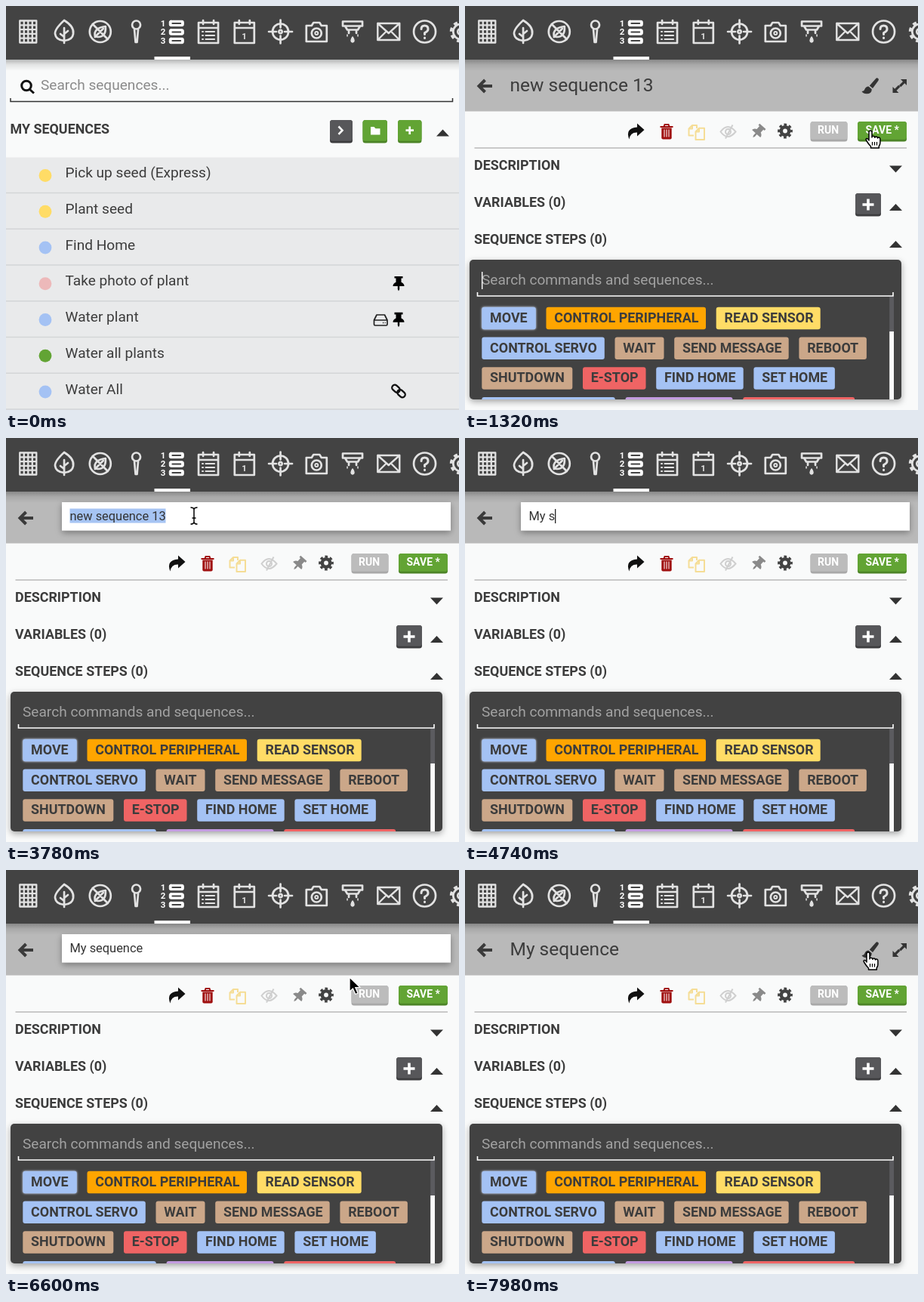
Write an HTML page that moves like this. It is 600 px wide and 535 px high and loops after 8000 ms.

```html
<!DOCTYPE html>
<html lang="en">
<head>
<meta charset="utf-8">
<title>Sequence editor</title>
<style>
  html, body { margin: 0; width: 100%; height: 100%; overflow: hidden; background: #f9fafa; }
  svg { display: block; width: 600px; height: 535px; }
  text { font-family: Roboto, sans-serif; font-size: 19.1px; fill: #3c3c3c; white-space: pre; }
  .head { font-size: 17.9px; font-weight: 700; }
  .small { font-size: 14px; font-weight: 700; fill: #fff; }
  .title { font-size: 24.5px; }
  .field { font-size: 16.4px; fill: #333; }
  .line { fill: none; stroke: #e2e2e2; stroke-width: 2.7; stroke-linecap: round; stroke-linejoin: round; }
  .mini { font-size: 11.5px; font-weight: 700; fill: #e2e2e2; stroke: none; }
</style>
</head>
<body>
<svg viewBox="0 0 600 535">
  <defs>
    <linearGradient id="fade" x2="0" y2="1">
      <stop stop-color="#000" stop-opacity=".27"/>
      <stop offset=".45" stop-color="#000" stop-opacity=".09"/>
      <stop offset="1" stop-color="#000" stop-opacity="0"/>
    </linearGradient>
    <filter id="shadow" x="-10%" y="-40%" width="120%" height="190%">
      <feDropShadow dx="0" dy="3" stdDeviation="4" flood-opacity=".35"/>
    </filter>
    <filter id="glow" x="-20%" y="-30%" width="140%" height="160%">
      <feDropShadow dx="0" dy="0" stdDeviation="1.6" flood-color="#d9e6ff"/>
    </filter>
    <clipPath id="panelClip"><rect x="6" y="336" width="572" height="185" rx="5"/></clipPath>
    <path id="up" d="M-8.5 4.5L0-4.5 8.5 4.5z" fill="#333"/>
    <path id="pin" d="M-5.5-9.5h11v2.6h-2v5.2q4 1.7 4 5.2h-6.3v4L0 10l-1.2-2.5v-4h-6.3q0-3.5 4-5.2v-5.2h-2z"/>
    <g id="gear" fill="none" stroke="#434343">
      <circle r="5.2" stroke-width="4.6"/>
      <circle r="8" stroke-width="3.8" stroke-dasharray="3.5 2.783" stroke-dashoffset="1.75"/>
    </g>
    <path id="beamShape" d="M-4.5-11q4 0 4.500 2.500.5-2.500 4.500-2.500M0-9V9M-4.500 11q4 0 4.500-2.500.5 2.500 4.500 2.500M-2.500 3h5"/>
  </defs>

  <rect width="600" height="535" fill="#f9fafa"/>

  <g id="listView">
    <g fill="none" stroke="#111" stroke-width="3"><circle cx="27" cy="105.5" r="6.3"/><path d="M31.5 110.5l5.500 5"/></g>
    <text x="46" y="111.2" style="fill:#8b8b8b">Search sequences...</text>
    <path d="M6 122v4.5h585.500V122" fill="none" stroke="#333" stroke-width="1.5"/>
    <text class="head" x="5.5" y="169">MY SEQUENCES</text>
    <g id="listButtons"></g>
    <path d="M440.5 159.500l5 5.200-5 5.200" fill="none" stroke="#fff" stroke-width="2.6"/>
    <path d="M483 160h4.500l2 2.200h6v8.300H483z" fill="#fff"/>
    <path d="M534.7 159.500v10.500M529.500 164.700H540" stroke="#fff" stroke-width="2.7"/>
    <use href="#up" x="578.5" y="168"/>
    <rect y="200.5" width="600" height="335" fill="#e9eaeb"/>
    <g id="rows"></g>
    <use href="#pin" x="520" y="367.5"/>
    <use href="#pin" x="520" y="415.3"/>
    <path d="M487.5 416l3.500-7h10.500l3.500 7v5.500q0 1.500-1.500 1.500H489q-1.500 0-1.500-1.500zH505M499 419.500h1.200M501.700 419.500h1"
      fill="none" stroke="#222" stroke-width="1.7" stroke-linejoin="round"/>
    <g transform="translate(520 510) rotate(42)" fill="none" stroke="#111" stroke-width="2.3">
      <rect x="-10.5" y="-3.7" width="11.5" height="7.4" rx="3.7"/>
      <rect x="-1" y="-3.7" width="11.5" height="7.4" rx="3.7"/>
    </g>
  </g>

  <g id="editView">
    <rect y="71" width="600" height="68.5" fill="#b9b9b9"/>
    <path d="M36 106H19M26.500 98l-8 8 8 8" fill="none" stroke="#3a3a3a" stroke-width="4"/>
    <g id="titleBar">
      <text id="title" class="title" x="59.5" y="113"></text>
      <g fill="#333">
        <path d="M546.5 95.500q2.500 1 .5 4l-7 9.500-4.200-3.600 8-9q1.500-1.500 2.700-.9z"/>
        <path d="M534.5 106.500l4.300 3.700q0 6-6.800 6-4.500 0-6.500-3.200 3.200 0 4-3 1.500-3.500 5-3.500z"/>
        <path d="M577 97h8v8l-2.700-2.700-5 5-2.300-2.300 5-5zM574.500 115h-8v-8l2.700 2.700 5-5 2.300 2.300-5 5z"/>
      </g>
    </g>
    <g id="editor">
      <rect x="74" y="85" width="515" height="37.5" fill="#fff" filter="url(#shadow)"/>
      <rect id="selection" x="84.5" y="93.5" width="127" height="19" fill="#a6c4f3"/>
      <text id="field" class="field" x="84.5" y="109"></text>
      <rect id="fieldCaret" y="94" width="1.2" height="19" fill="#111"/>
    </g>

    <path d="M228 155.500l9.500 8.500-9.500 8.500v-5q-9-.5-10.500 9-6-14.500 10.500-16z" fill="#111"/>
    <path d="M260.3 161.500h13.400V174.500q0 2-2 2h-9.400q-2 0-2-2z" fill="#a01010"/>
    <path d="M258.5 160h17M263.500 159.500l1-2.500h5l1 2.500" fill="none" stroke="#a01010" stroke-width="2"/>
    <path d="M264 163.500v10M267 163.500v10M270 163.500v10" stroke="#f3dcdc" stroke-width="1.2"/>
    <path d="M303 171.500h-6.500v-9l4.500-4.500h6v4M301 158v4.500h-4.500M305.500 166.500l4.500-4.700h7V177h-11.500zH310v-4.700"
      fill="none" stroke="#f5dd96" stroke-width="2" stroke-linejoin="round"/>
    <g fill="none" stroke="#cfcfcf" stroke-width="2">
      <path d="M338.5 166.500q9.500-13 20 0-10.500 13-20 0z"/><circle cx="348.5" cy="166.5" r="3.5"/><path d="M354.5 157.500l-9.500 18"/>
    </g>
    <use href="#pin" fill="#8a8a8a" transform="translate(388 166.5) rotate(42)"/>
    <use href="#gear" x="424" y="165.5"/>
    <g id="editButtons"></g>
    <text class="small" x="467" y="169">RUN</text>
    <text class="small" x="530.5" y="169">SAVE *</text>
    <path d="M12.5 188H585" stroke="#c9c9c9" stroke-width="1.8"/>
    <text class="head" x="12" y="217">DESCRIPTION</text>
    <text class="head" x="12" y="266">VARIABLES (0)</text>
    <text class="head" x="12" y="315">SEQUENCE STEPS (0)</text>
    <path d="M534 255.500v15M526.500 263h15" stroke="#fff" stroke-width="3.6"/>
    <use href="#up" transform="translate(570.5 216) scale(1 -1)"/>
    <use href="#up" x="570.5" y="266.5"/>
    <use href="#up" x="570.5" y="315.5"/>

    <rect x="6" y="336" width="572" height="185" rx="5" fill="#434343" filter="url(#shadow)"/>
    <text x="22" y="369.3" style="fill:#a2a2a2">Search commands and sequences...</text>
    <rect id="searchCaret" x="22" y="352" width="1.4" height="23" fill="#fff"/>
    <g id="commands" clip-path="url(#panelClip)"></g>
    <rect x="562.2" y="385" width="5.8" height="46" fill="#5b5b5f"/>
    <rect x="562.2" y="431" width="5.8" height="90" fill="#fafafa"/>
    <path d="M16.5 379v5h550.500v-5" fill="none" stroke="#fff" stroke-width="1.6"/>
  </g>

  <rect y="71" width="600" height="15" fill="url(#fade)"/>
  <rect width="600" height="71" fill="#434343"/>
  <rect x="196.5" y="67" width="47.5" height="4" fill="#fff"/>
  <g id="nav" class="line"></g>

  <path id="arrow" d="M0 0v19l4.400-4 3.400 7.500 3.300-1.500-3.300-7.300 6-.4z" stroke="#fff" stroke-width="1.3"/>
  <g id="hand">
    <path d="M-2 1Q-2-1 0-1T2 1v7q0-2 2-1.700 1.800.2 1.800 2 .2-1.500 2-1.300 1.700.2 1.700 2 .5-1.200 1.900-.9 1.500.3 1.500 2.200v4.700q0 2.500-1.600 4.500v2.500H.5V20q-3-3-6-8-1-2 .5-2.500Q-3.500 9-2 12z"
      fill="#fff" stroke="#000" stroke-width="1.5" stroke-linejoin="round"/>
    <path d="M2.500 14v4.500M5.500 14v4.500M8.500 14v4.500" stroke="#000" stroke-width="1.2"/>
  </g>
  <g id="beam" fill="none">
    <use href="#beamShape" stroke="#fff" stroke-width="3"/>
    <use href="#beamShape" stroke="#000" stroke-width="1.5"/>
  </g>
</svg>

<script>
const $ = id => document.getElementById(id);
const add = (id, markup) => $(id).insertAdjacentHTML('beforeend', markup);
const show = (id, on) => { $(id).style.display = on ? '' : 'none'; };

const GREEN = '#62a434', DARK = '#57575a', BLUE = '#a4c2f4', TAN = '#cba789', YELLOW = '#ffdc66', RED = '#ef6464';

// Raised button: a darker base under a lighter face.
const button = (x, y, w, h, fill, base) =>
  `<rect x="${x}" y="${y}" width="${w}" height="${h}" rx="3.5" fill="${base}"/>
   <rect x="${x}" y="${y}" width="${w}" height="${h - 2.8}" rx="3.5" fill="${fill}"/>`;

add('listButtons', button(429, 151, 30, 30.5, DARK, '#3c3c3e')
  + button(472.5, 151, 32.5, 30.5, GREEN, '#4c8427') + button(519, 151, 31.5, 30.5, GREEN, '#4c8427'));
add('editButtons', button(457.5, 153, 49, 26.5, '#bcbcbc', '#a8a8a8')
  + button(520, 153, 65, 26.5, GREEN, '#4c8427') + button(517, 248, 34, 30.5, DARK, '#3c3c3e'));

[['Pick up seed (Express)', YELLOW], ['Plant seed', YELLOW], ['Find Home', BLUE], ['Take photo of plant', '#edb9ba'],
 ['Water plant', BLUE], ['Water all plants', GREEN], ['Water All', BLUE]].forEach(([name, fill], i) => {
  const y = 200.5 + i * 47.75;
  add('rows', `<circle cx="52" cy="${y + 24}" r="8.4" fill="${fill}"/>
    <text x="78.5" y="${y + 26.7}">${name}</text>
    <path d="M0 ${y + 47}H600" stroke="#d3d5d7" stroke-width="1.3"/>`);
});

const commands = [
  [['MOVE', 71.5, BLUE], ['CONTROL PERIPHERAL', 211.5, '#ffa500'], ['READ SENSOR', 138, YELLOW]],
  [['CONTROL SERVO', 162.5, BLUE], ['WAIT', 65, TAN], ['SEND MESSAGE', 151.5, TAN], ['REBOOT', 89.5, TAN]],
  [['SHUTDOWN', 120, TAN], ['E-STOP', 83.5, RED], ['FIND HOME', 115.5, BLUE], ['SET HOME', 107.5, BLUE]],
  [['', 176.5, BLUE], ['', 142, '#c39be0'], ['', 148, RED]]
];
commands.forEach((row, r) => {
  let x = 22.3;
  const y = 398.7 + r * 39.8;
  for (const [name, w, fill] of row) {
    const glow = name === 'MOVE' ? ' filter="url(#glow)"' : '';
    add('commands', `<rect x="${x}" y="${y}" width="${w}" height="29.5" rx="3" fill="${fill}"${glow}/>
      <text class="head" x="${x + 10.8}" y="${y + 20}">${name}</text>`);
    x += w + 13.7;
  }
});

const calendar = '<path d="M-13-12h26v27h-26zM-13-5h26M-7-15v5M7-15v5"/>';
const bars = [-11, 0.5, 12].map((y, i) =>
  `<rect x="-4" y="${y - 3.7}" width="19" height="7.4" rx="2" fill="#fff" stroke="#fff" stroke-width="1"/>
   <path d="M0 ${y}h11" stroke="#434343" stroke-width="1.8"/>
   <text class="mini" x="-15.5" y="${y + 3.7}" style="fill:#fff">${i + 1}</text>`).join('');
const icons = [
  '<path d="M-11-14.500h22v29h-22zM-5.500-14.500v29M0-14.500v29M5.500-14.500v29M-11-8.700h22M-11-2.900h22M-11 2.900h22M-11 8.700h22" stroke-width="2.3"/>',
  '<path d="M0-15C10-9 13-3 12 3Q11 11 0 12-11 11-12 3-13-3 0-15zM0-5v20M0 3l5-4M0 7l-5-4"/>',
  '<circle r="14"/><path d="M-10-10L10 10M-7 6Q-9-5 7-7 8 7-3 7zM-7 7L4-4"/>',
  '<path d="M-2.500-3L-1 14H1L2.500-3"/><circle cy="-9" r="5.5"/>',
  bars,
  calendar + '<path d="M-8 0h1M-3.500 0H8M-8 5h1M-3.500 5H8M-8 10h1M-3.500 10H8" stroke-width="2.2"/>',
  calendar + '<text class="mini" x="-3.5" y="9.5">1</text>',
  '<circle r="10.5"/><circle r="2.2"/><path d="M0-15.500v10M0 5.500v10M-15.500 0h10M5.500 0h10"/>',
  '<path d="M-13.500-8h7l2.500-4h8l2.500 4h7v21h-27z"/><circle cy="2" r="6.5"/><circle cy="2" r="2" stroke-width="2"/>',
  '<path d="M-13-13.500h26v6h-26zM-10-7.500l3 5H7l3-5M-5-2.500V2M5-2.500V2"/><path d="M0 7q-4 6 0 7 4-1 0-7zM-7 4v2M7 4v2" fill="#e2e2e2" stroke-width="1.5"/>',
  '<path d="M-14.500-11h29v22h-29zL0 2 14.500-11M-14.500 11l10-10M14.500 11l-10-10" stroke-width="2.4"/>',
  '<circle r="14.5"/><path d="M-4.500-3.500Q-4.500-8 0-8T4.500-3.500Q4.500-.5 0 1.500V3.500M0 8v.4" stroke-width="3"/>',
  '<circle r="10"/><circle r="4"/><circle r="12.5" stroke-dasharray="5 4.817" stroke-linecap="butt" stroke-width="4"/>'
];
icons.forEach((icon, i) => add('nav', `<g transform="translate(${29.3 + i * 47.75} 34)">${icon}</g>`));

const LOOP = 8000, STEP = 60, OPENED = 1080, EDIT = 2820, TYPE = 4080, KEY = 180, MOVE = 5940, BLUR = 6900;
const OLD = 'new sequence 13', NEW = 'My sequence';

// Cursor stops: time, x, y.
const path = [[120, 602, 442], [780, 537, 166], [1560, 537, 166], [2400, 255.5, 101], [2700, 249, 103],
  [MOVE, 249, 103], [6600, 455, 142], [7020, 455, 142], [7860, 534, 110], [LOOP, 534, 110]];

function cursorAt(t) {
  const i = path.findIndex(p => p[0] > t);
  const [t0, x0, y0] = path[i - 1], [t1, x1, y1] = path[i];
  const u = (t - t0) / (t1 - t0), e = u * u * (3 - 2 * u);
  return [x0 + (x1 - x0) * e, y0 + (y1 - y0) * e];
}

function cursorKind(t, x, y) {
  if (t >= EDIT && t < BLUR && y < 122) return 'beam';
  const overAdd = t < OPENED && x < 551 && y < 181;
  const overSave = t >= OPENED && t < EDIT && x > 520 && y > 153;
  const overBrush = t >= BLUR && x > 524;
  return overAdd || overSave || overBrush ? 'hand' : 'arrow';
}

function drawCursor(t) {
  const hidden = t < path[0][0] || t >= TYPE && t < MOVE;
  const [x, y] = hidden ? [0, 0] : cursorAt(t);
  const kind = hidden ? '' : cursorKind(t, x, y);
  for (const id of ['arrow', 'hand', 'beam']) {
    show(id, id === kind);
    $(id).setAttribute('transform', `translate(${x} ${y})`);
  }
}

function render(t) {
  const editing = t >= EDIT && t < BLUR;
  const typed = Math.max(0, Math.min(NEW.length, Math.floor((t - TYPE) / KEY) + 1));
  const idle = t - TYPE - KEY * (NEW.length - 1);
  show('listView', t < OPENED);
  show('editView', t >= OPENED);
  show('titleBar', !editing);
  show('editor', editing);
  show('selection', !typed);
  show('searchCaret', t < EDIT && (t - OPENED) % 1000 < 500);
  show('fieldCaret', typed > 0 && (idle < 0 || idle % 1000 < 500));
  $('title').textContent = t < BLUR ? OLD : NEW;
  $('field').textContent = typed ? NEW.slice(0, typed) : OLD;
  if (editing) $('fieldCaret').setAttribute('x', 84.5 + $('field').getComputedTextLength());
  drawCursor(t);
}

const start = performance.now();
function tick() {
  const t = (performance.now() - start) % LOOP;
  render(Math.floor(t / STEP) * STEP);
  requestAnimationFrame(tick);
}
tick();
</script>
</body>
</html>
```
